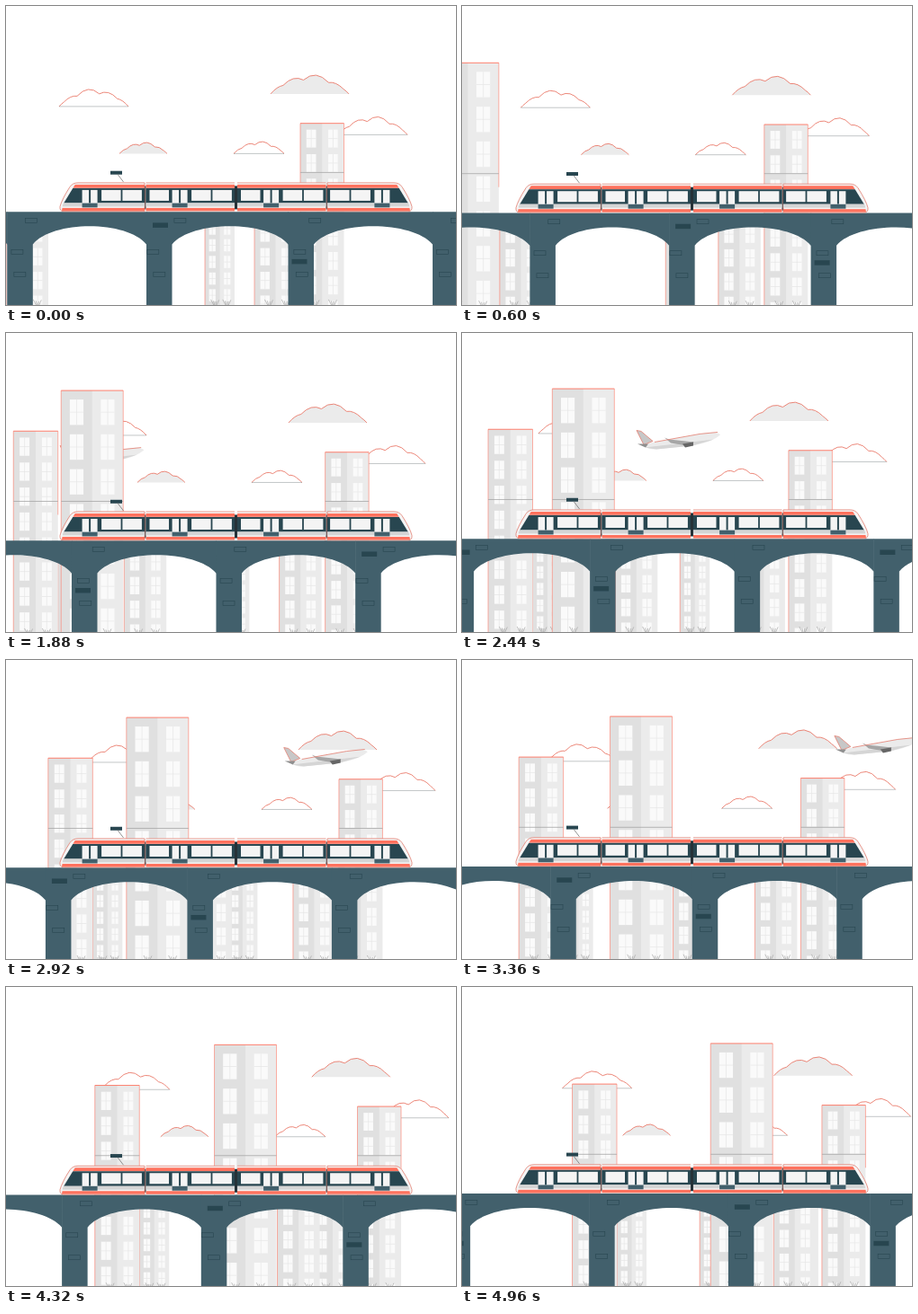
Write an HTML page with a canvas that moves like this. It is 500x333 px and loops after 5 s.

```html
<!DOCTYPE html>
<html lang="en">
<head>
<meta charset="utf-8">
<title>Train over the viaduct</title>
<style>
html, body { margin: 0; width: 100%; height: 100%; overflow: hidden; background: #fff; }
canvas { display: block; width: 500px; height: 333px; }
</style>
</head>
<body>
<canvas id="stage" width="500" height="333"></canvas>
<script>
const ctx = document.getElementById('stage').getContext('2d');
const LOOP = 5000, STEP = 40, BOTTOM = 345;
const CORAL = '#ff725e', STONE = '#42606c', DARK = '#284650', INK = '#263238';
const PALE = '#ebebeb', SHADE = '#e0e0e0', GLASS = '#f4f4f4', WHITE = '#fff';

function rect(x, y, w, h, color) {
  ctx.fillStyle = color;
  ctx.fillRect(x, y, w, h);
}

function line(x1, y1, x2, y2, color, width = 1) {
  ctx.beginPath();
  ctx.moveTo(x1, y1);
  ctx.lineTo(x2, y2);
  ctx.strokeStyle = color;
  ctx.lineWidth = width;
  ctx.stroke();
}

function shape(path, fill, stroke) {
  const p = new Path2D(path);
  ctx.fillStyle = fill;
  ctx.fill(p);
  if (!stroke) return;
  ctx.strokeStyle = stroke;
  ctx.lineWidth = .9;
  ctx.stroke(p);
}

function at(x, y, draw, flip = false) {
  ctx.save();
  ctx.translate(x, y);
  if (flip) ctx.scale(-1, 1);
  draw();
  ctx.restore();
}

function random(seed) {
  const n = Math.sin(seed * 12.9898) * 43758.5453;
  return n - Math.floor(n);
}

// Bumps between valleys on an arched envelope; wider bumps rise higher.
const VALLEYS = [.16, .42, .74, .93, 1];

function cloud(x, base, w, h, filled, flip) {
  const envelope = u => 1 - .72 * Math.max(0, Math.sin(Math.PI * u)) ** .7;
  at(flip ? x + w : x, base - h, () => {
    ctx.beginPath();
    ctx.moveTo(0, h);
    VALLEYS.forEach((u, i) => {
      const from = VALLEYS[i - 1] || 0;
      const crest = (envelope(from) + envelope(u)) / 2 - 6 * (u - from) ** 2;
      ctx.quadraticCurveTo((from + u) / 2 * w, crest * h, u * w, envelope(u) * h);
    });
    ctx.fillStyle = filled ? PALE : WHITE;
    ctx.fill();
    ctx.strokeStyle = '#ea7a6a';
    ctx.lineWidth = .9;
    ctx.stroke();
    if (!filled) line(0, h, w, h, 'rgba(38,50,56,.4)', .7);
  }, flip);
}

function clouds(t) {
  const drift = 10.6 * t;
  cloud(59 + drift, 111.5, 77, 20, false, true);
  cloud(126 + drift, 164, 53, 13, true);
  cloud(253 + drift, 164, 56, 14, false);
  cloud(294 + drift, 97.5, 87, 22, true);
  cloud(369 + drift, 143, 77, 21, false);
}

function plane(t) {
  const flight = t - 2.44;
  at(194 + 239 * flight, 107 - 27 * flight, () => {
    shape('M7 17L20 14L70 5Q90 1 93 6Q84 14 62 18L22 22Q12 23 7 17', PALE);
    shape('M9 20L86 11L62 18L22 22Z', '#d5d5d5');
    shape('M0 1L5 2L18 13L8 17Z', '#c7c7c7', '#e58b7e');
    shape('M1 16H13L10 20Z', '#8f8f8f');
    shape('M31 9L36 11L64 14L56 18L38 15Z', '#a6a6a6');
    shape('M51 16L63 14V18L54 20Z', '#666');
    line(20, 14, 70, 5, '#e58b7e', .9);
    line(70, 5, 90, 3, '#e58b7e', .9);
  });
}

function tuft(x) {
  for (let lean = -5; lean <= 5; lean += 3) line(x, 336, x + lean, 329 - Math.abs(lean) / 2, '#a6a6a6', .7);
}

// A two-faced block of flats; windows scale with its width.
function building(x, top, w) {
  const half = w / 2, paneW = w * .22, paneH = w * .41;
  const outline = 'rgba(255,114,94,.7)', high = top < 185;
  rect(x, top, w, BOTTOM - top, PALE);
  rect(x, top, half, BOTTOM - top, SHADE);
  for (let y = top + w * .145; y < BOTTOM; y += w * .562) {
    for (const centre of [x + w * .25, x + w * .75]) {
      rect(centre - paneW / 2, y, paneW, paneH, '#fafafa');
      line(centre, y, centre, y + paneH, '#e6e6e6', .7);
      line(centre - paneW / 2, y + paneH / 2, centre + paneW / 2, y + paneH / 2, '#e6e6e6', .7);
    }
  }
  line(x, top, x, BOTTOM, outline, .8);
  if (high) {
    line(x, top, x + w, top, CORAL, .9);
    line(x + w, top, x + w, 200, outline, .8);
    line(x, 185, x + w, 185, '#a6a6a6', .8);
  }
  tuft(x + w * .35);
  tuft(x + w * .75);
}

function city(t) {
  const far = 14.7 * t, left = -61.5 + 37.1 * t, tall = -70 + 69.8 * t;
  building(221 + 8.7 * t, 236, 33);
  building(276 + far, 236, 47);
  building(327 + far, 130.3, 48.5);
  building(left + 49.5, 236, 33);
  building(left, 106.8, 49.5);
  building(tall + 70, 236, 47);
  building(tall, 61.6, 69);
}

// The viaduct repeats three piers, each followed by an arch.
const PIER = 28.5, SPANS = [129, 132, 126.2], DECK = 228.8, SPRING = 265;
const REPEAT = 3 * PIER + SPANS.reduce((a, b) => a + b);

function bay(x, span) {
  const start = x + PIER, end = start + span;
  ctx.beginPath();
  ctx.moveTo(x, BOTTOM);
  ctx.lineTo(x, DECK);
  ctx.lineTo(end + .5, DECK);
  ctx.lineTo(end + .5, SPRING);
  ctx.lineTo(end, SPRING);
  ctx.bezierCurveTo(end - span * .17, 238, start + span * .17, 238, start, SPRING);
  ctx.lineTo(start, BOTTOM);
  ctx.fillStyle = STONE;
  ctx.fill();
}

function masonry(x, pier) {
  ctx.strokeStyle = DARK;
  ctx.lineWidth = .6;
  [236, 271, 296].forEach((y, row) => {
    const shift = random(pier * 3 + row + 1) * 14;
    ctx.strokeRect(x + shift + (row ? 0 : 18), y, 13, 5);
  });
  if (pier === 0) rect(x + 7, 241, 17, 5.5, DARK);
  if (pier === 1) rect(x + 4, 281.5, 17, 5.5, DARK);
}

function viaduct(t) {
  const start = (156 + 123.5 * t) % REPEAT;
  for (let x = start - 2 * REPEAT; x < 500; x += REPEAT) {
    let pierX = x;
    SPANS.forEach((span, i) => {
      bay(pierX, span);
      masonry(pierX, i);
      pierX += PIER + span;
    });
  }
}

function door(x) {
  rect(x, 219, 17, 5, STONE);
  rect(x, 204.5, 7.5, 14.5, GLASS);
  rect(x + 9.5, 204.5, 7.5, 14.5, GLASS);
}

function carSide(x, w, slots, doorSlot) {
  rect(x, 198.5, w, 3.8, CORAL);
  rect(x, 202.5, w, 16.5, DARK);
  rect(x, 219, w, 4, '#d5d5d5');
  rect(x, 224.5, w, 3.5, CORAL);
  for (let i = 0; i < slots; i++) {
    const slot = x + w - 94.5 + 23.3 * (i + 4 - slots);
    if (i === doorSlot) door(slot + 1.8);
    else rect(slot, 204.5, 21.5, 12, GLASS);
  }
}

function middleCar(x) {
  rect(x, 196.5, 98.5, 32, '#f5f5f5');
  carSide(x, 98.5, 4, 1);
  line(x, 196.5, x + 98.5, 196.5, '#e58b7e', .8);
}

function cabCar() {
  const body = 'M154 196.5H80Q74 196.5 71 201Q62 215 60 223Q59.5 228.3 64 228.3H154Z';
  shape(body, '#f5f5f5', '#e58b7e');
  ctx.save();
  ctx.clip(new Path2D('M154 198H77L63 221L62 228H154Z'));
  carSide(55.5, 98.5, 3, 0);
  ctx.restore();
}

function train() {
  rect(153, 200, 206, 26, INK);
  cabCar();
  at(511, 0, cabCar, true);
  middleCar(155.5);
  middleCar(257);
  rect(116, 183.3, 13, 4, DARK);
  line(124, 187, 130.5, 195.5, '#777', .8);
}

function draw(t) {
  const bob = .4 + 1.3 * (1 - Math.cos(2 * Math.PI * t / .8));
  rect(0, 0, 500, 333, WHITE);
  at(0, bob, () => {
    clouds(t);
    plane(t);
    city(t);
    viaduct(t);
    train();
  });
}

function frame() {
  const ms = performance.now() % LOOP;
  draw(Math.floor(ms / STEP) * STEP / 1000);
  requestAnimationFrame(frame);
}
frame();
</script>
</body>
</html>
```
